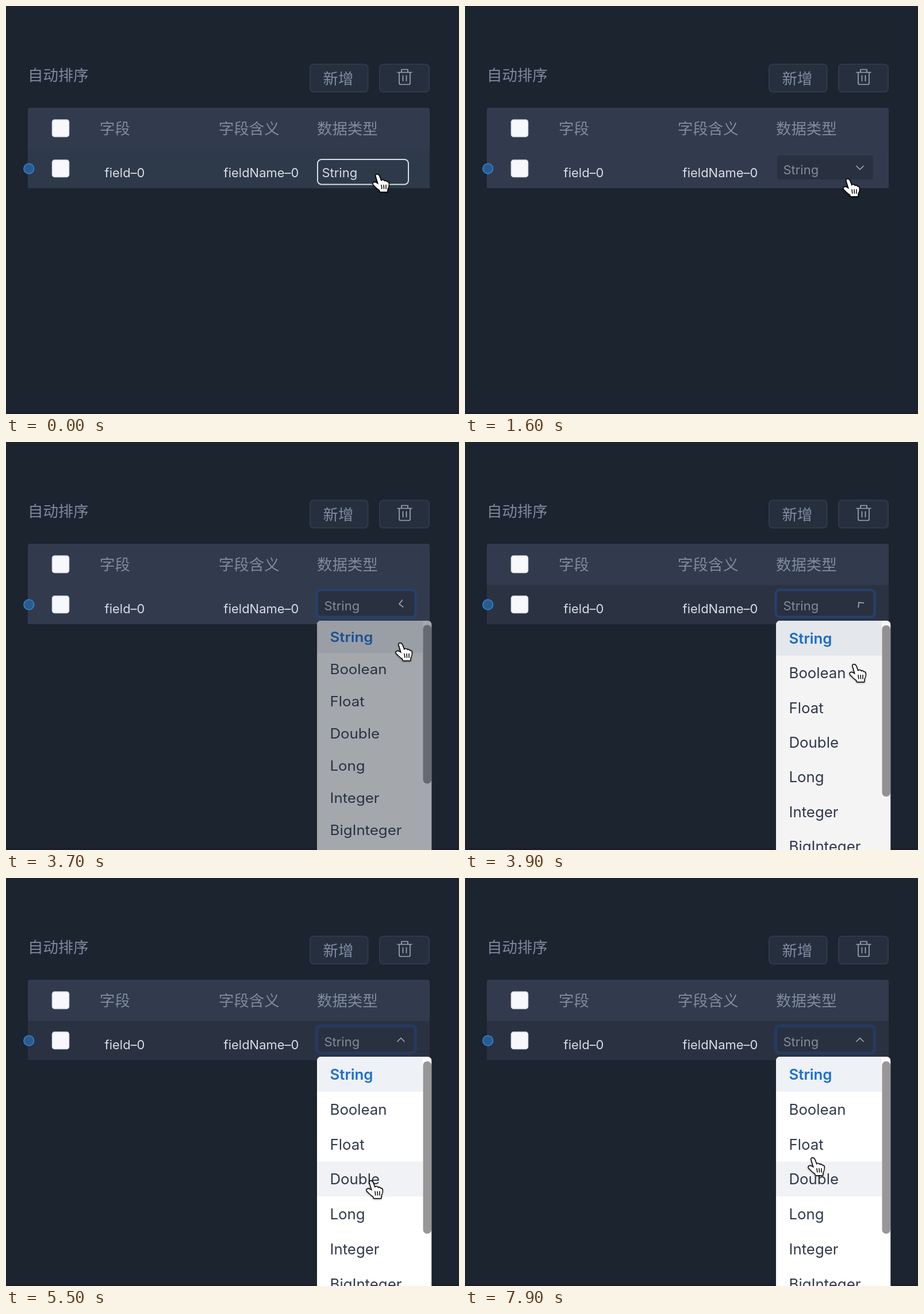
Recreate the animation shown at these times as an HTML page with a canvas. Size 788 by 710 pixels, loop 8 s.

```html
<!DOCTYPE html>
<html lang="zh">
<head>
<meta charset="utf-8">
<style>
html, body { margin: 0; width: 100%; height: 100%; overflow: hidden; background: #1c2430; }
canvas { display: block; }
</style>
</head>
<body>
<canvas id="stage" width="788" height="710"></canvas>
<script>
const ctx = document.getElementById('stage').getContext('2d');
const LOOP = 8000, STEP = 100, ROW_HEIGHT = 60.8, MENU_TOP = 311;
const PAGE = '#1c2430';
const CJK = '26.4px "Noto Sans CJK SC", "Noto Sans CJK", sans-serif';
const LATIN = '22px Inter, sans-serif';
const OPTIONS = ['String', 'Boolean', 'Float', 'Double', 'Long', 'Integer', 'BigInteger'];

// Pointer path: time, x, y of the fingertip
const PATH = [
  [0, 645, 293], [800, 659, 292.5], [1200, 659, 292.5], [1600, 665, 301],
  [1900, 669, 308], [2300, 680, 299], [2700, 686, 289], [3400, 686, 289],
  [3700, 685, 350], [3900, 676, 387], [4300, 673, 407], [5200, 634, 528],
  [5500, 634, 527], [6300, 610, 485], [6400, 609, 484], [6500, 609, 484],
  [7000, 611, 511], [7500, 611, 511], [7900, 604, 487]
];
const HAND = new Path2D('M-1 4C-3 0 2 -1 4 3L7.5 12C9 9.5 12.5 10 13 12.5C14 11 17 11.5 17.3 13.8C19 13 20.5 14 20.5 16C21 20 20 22 18.5 25L18 30H6L5 27C1 25 -2 21 -5.5 18C-8 15 -4 13 -1 15L3 17.5Z');
const CREASES = new Path2D('M8 18.5L8.8 25M12 18.5L12.5 25M16 18.5V25');
const TRASH = new Path2D('M681 115.5H706M688 115V110.5H699V115M684 116V134Q684 136.5 686.5 136.5H700.5Q703 136.5 703 134V116M690.5 121V130.5M696.5 121V130.5');

const progress = (t, start, duration) => Math.min(1, Math.max(0, (t - start) / duration));
const easeOut = (u, power) => 1 - (1 - u) ** power;
const mix = (a, b, u) => a + (b - a) * u;
const mixColor = (a, b, u) => `rgb(${a.map((v, i) => Math.round(mix(v, b[i], u)))})`;

function pointerAt(t) {
  const i = PATH.findIndex(p => p[0] > t);
  if (i < 0) return PATH[PATH.length - 1].slice(1);
  const [a, b] = [PATH[i - 1], PATH[i]];
  const u = progress(t, a[0], b[0] - a[0]);
  return [mix(a[1], b[1], u), mix(a[2], b[2], u)];
}

function box(x, y, w, h, radius, fill, stroke, line = 2) {
  ctx.beginPath();
  ctx.roundRect(x, y, w, h, radius);
  if (fill) { ctx.fillStyle = fill; ctx.fill(); }
  if (stroke) { ctx.strokeStyle = stroke; ctx.lineWidth = line; ctx.stroke(); }
}

function text(string, x, baseline, color, font) {
  ctx.font = font;
  ctx.fillStyle = color;
  ctx.fillText(string, x, baseline);
}

function strokePath(path, color, width) {
  ctx.strokeStyle = color;
  ctx.lineWidth = width;
  ctx.stroke(path);
}

function drawTable(t) {
  box(0, 0, 788, 710, 0, PAGE);
  box(0, 706, 788, 4, 0, '#19202b');
  text('自动排序', 38, 129.5, '#7e8a9c', CJK);
  box(529, 101.5, 100.5, 48, 6, '#262f3e', '#303a4b');
  text('新增', 551.5, 135.5, '#7e8ba1', CJK);
  box(650, 101.5, 86, 48, 6, '#262f3e', '#303a4b');
  strokePath(TRASH, '#9ca4af', 1.7);

  const hover = [50, 59, 78];
  const rowColor = t < 3700
    ? mixColor([46, 58, 74], hover, progress(t, 0, 700))
    : mixColor(hover, [42, 50, 65], progress(t, 3700, 230));
  box(38, 249, 699, 68, 0, rowColor);
  box(38, 177, 699, 72, [4, 4, 0, 0], '#323a4d');
  for (const y of [198, 268]) box(80.5, y, 29, 29.5, 4, '#f6f8fb', '#dcdfe6', 1.5);
  text('字段', 163, 222.5, '#7e8ba1', CJK);
  text('字段含义', 370, 222.5, '#7e8ba1', CJK);
  text('数据类型', 541, 222.5, '#7e8ba1', CJK);
  text('field–0', 171.5, 298, '#d8dce3', LATIN);
  text('fieldName–0', 378.5, 298, '#d8dce3', LATIN);

  ctx.beginPath();
  ctx.arc(39.8, 283, 8.8, 0, 7);
  ctx.fillStyle = '#2b5b8d';
  ctx.fill();
  ctx.strokeStyle = '#2d87dc';
  ctx.lineWidth = 1.6;
  ctx.stroke();
}

function drawSelect(t) {
  if (t < 1200) {
    box(542, 267, 158, 43.5, 7, null, '#d9dde3');
    text('String', 549.5, 298, '#d8dce3', LATIN);
    return;
  }
  box(543, 260, 167, 42, 4, '#293140');
  const focus = progress(t, 1800, 400);
  if (focus) {
    ctx.globalAlpha = focus;
    const open = progress(t, 3900, 400);
    box(540.5, 257.5, 172, 47, 7, '#293140', mixColor([38, 65, 111], [38, 58, 98], open), mix(4, 5, open));
    ctx.globalAlpha = 1;
  }
  text('String', 553.5, 292.5, '#818b99', LATIN);

  ctx.save();
  ctx.translate(687, 281.5);
  ctx.rotate(Math.PI * easeOut(progress(t, 3500, 750), 2));
  strokePath(new Path2D('M-6 -3L0 3L6 -3'), '#a2a9b3', 1.7);
  ctx.restore();
}

function drawMenu(t, pointerY) {
  const elapsed = t - 3500;
  if (elapsed <= 0) return;
  const opacity = easeOut(progress(elapsed, 60, 530), 3);
  const hovered = Math.floor((pointerY + 11 - MENU_TOP) / ROW_HEIGHT);
  ctx.save();
  ctx.translate(541, MENU_TOP);
  ctx.scale(1, 1 - Math.exp(-elapsed / 79));
  ctx.beginPath();
  ctx.roundRect(0, 0, 199.5, 520, 7);
  ctx.clip();
  box(0, 0, 199.5, 520, 0, '#fff');
  OPTIONS.forEach((name, i) => {
    const top = i * ROW_HEIGHT;
    const isHovered = i === hovered && (i !== 1 || t > 3900);
    if (i === 0 || isHovered) box(0, top, 184, ROW_HEIGHT, 0, i === 0 ? '#eef1f5' : '#f0f2f5');
    text(name, 22.5, top + 40, i ? '#303a4c' : '#1a70d2', `${i ? 400 : 600} 25.8px Inter, sans-serif`);
  });
  box(184.5, 8, 14.5, 300, 7, '#979797');
  // Fade the menu as one layer by veiling it with the page colour
  ctx.globalAlpha = 1 - opacity;
  box(0, 0, 199.5, 520, 0, PAGE);
  ctx.restore();
}

function drawPointer(t, x, y) {
  const pressed = (t >= 1000 && t < 1200) || (t >= 3100 && t < 3300);
  if (pressed) {
    ctx.beginPath();
    ctx.arc(x, y, 58, 0, 7);
    ctx.strokeStyle = 'rgba(0,0,0,.5)';
    ctx.lineWidth = 4;
    ctx.stroke();
  }
  ctx.save();
  ctx.translate(x, y);
  ctx.shadowColor = 'rgba(0,0,0,.4)';
  ctx.shadowBlur = 3;
  ctx.shadowOffsetY = 1;
  strokePath(HAND, '#000', 3);
  ctx.shadowColor = 'transparent';
  ctx.fillStyle = '#fff';
  ctx.fill(HAND);
  strokePath(CREASES, '#000', 1.5);
  ctx.restore();
}

ctx.lineJoin = ctx.lineCap = 'round';
function draw(now) {
  const t = Math.floor((now % LOOP) / STEP) * STEP;
  const [x, y] = pointerAt(t);
  drawTable(t);
  drawSelect(t);
  drawMenu(t, y);
  drawPointer(t, x, y);
}

let start;
function tick(now) {
  start ??= now;
  draw(now - start);
  requestAnimationFrame(tick);
}
draw(0);
requestAnimationFrame(tick);
</script>
</body>
</html>
```
